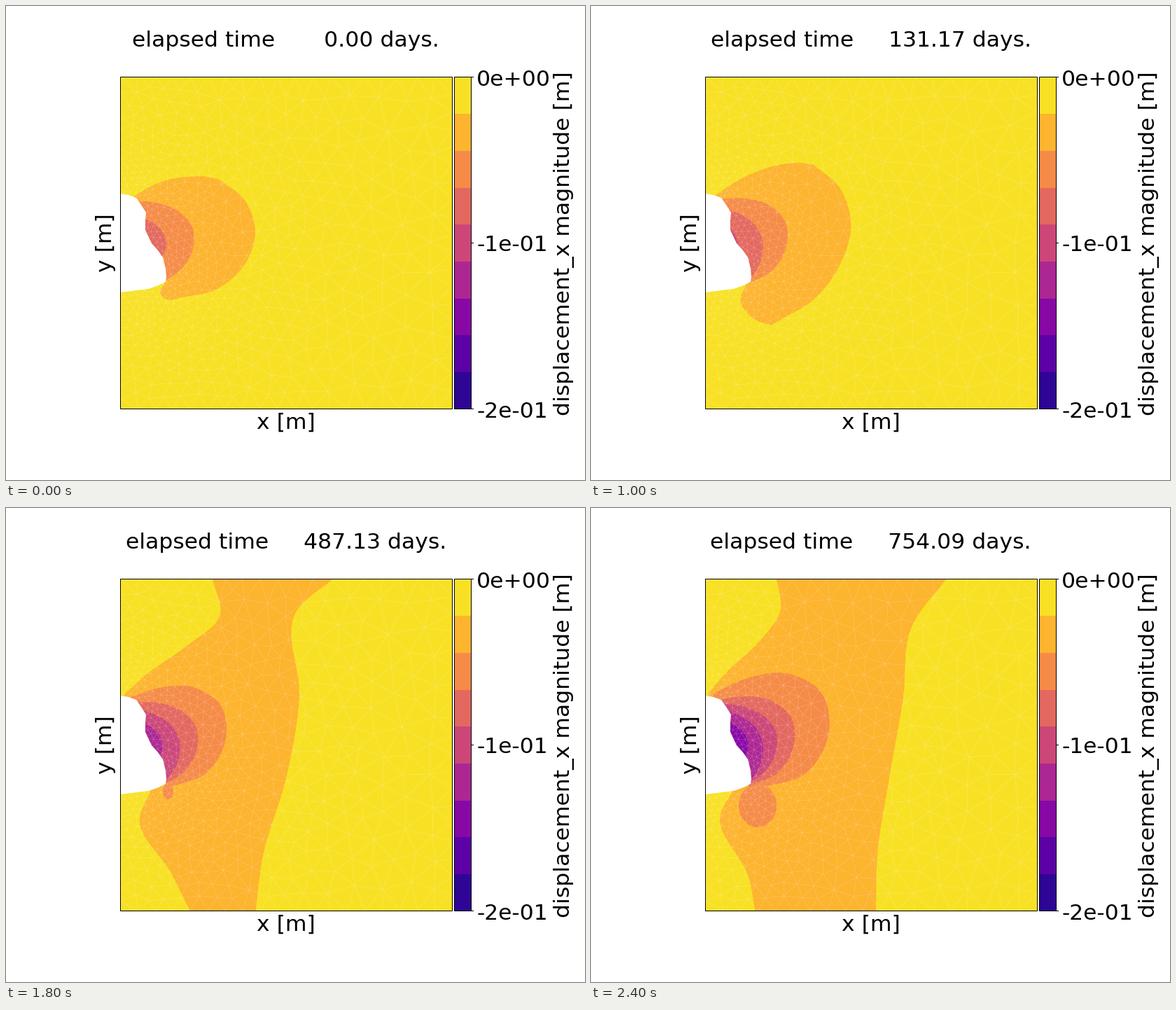
Write a matplotlib script that moves like this. It is 827x677 px and loops after 2500 ms.

```python
import numpy as np
import matplotlib.pyplot as plt
from matplotlib.animation import FuncAnimation
from matplotlib.collections import LineCollection
from matplotlib.patches import Polygon, Rectangle
from matplotlib.path import Path
from matplotlib.tri import Triangulation

W, H, DPI = 827, 677, 64
PT = 72 / DPI
X0, X1, Y0, Y1 = 163.5, 637.5, 101.5, 575.5
MERGE = 465  # day on which the outer band reaches top and bottom

# Time steps grow by half until they reach their cap.
DAYS = np.append(0, np.cumsum(1e5 / 86400 * 1.5 ** np.minimum(np.arange(24), 9)))

CAVITY = np.array([
    (150, 267), (163, 268), (175, 270), (186, 274), (193, 284), (200, 295),
    (199, 306), (199, 320), (208, 339), (217, 349), (224, 359), (228, 375),
    (229, 387), (228, 394), (218, 399), (204, 404), (163, 409), (150, 409)])
INSIDE = [(185, 340)]  # contours close through the cavity

# Outer band: upper left, right and lower left edges at four days.
BLOB_START = ([(181, 273), (204, 259), (232, 248), (258, 244), (281, 243)],
              [(303, 247), (340, 276), (356, 322), (341, 369), (302, 404), (248, 417)],
              [(236, 420), (225, 417), (220, 407), (227, 397)])
BLOB_END = ([(170, 265), (206, 236), (254, 207), (296, 185), (331, 177)],
            [(353, 178), (390, 218), (408, 292), (388, 375), (351, 460), (326, 522)],
            [(310, 541), (262, 525), (198, 447), (208, 403)])
STRIP_START = ([(168, 266), (200, 235), (252, 195), (294, 150), (284, 98)],
               [(484, 98), (428, 157), (428, 270), (409, 384), (381, 497), (373, 580)],
               [(255, 580), (233, 525), (189, 440), (205, 405)])
STRIP_END = ([(167, 265), (196, 232), (240, 191), (271, 144), (264, 98)],
             [(510, 98), (457, 172), (446, 270), (427, 380), (409, 497), (407, 580)],
             [(235, 580), (226, 530), (185, 437), (202, 405)])

# All inner levels share one family of curves, ordered by load / level.
RATIO = [0.28, 0.333, 0.355, 0.5, 0.98]
FAMILY = np.array([
    [(190, 318), (196, 322), (200, 327), (203, 333), (205, 338), (206, 344), (200, 348)],
    [(197, 303), (211, 311), (222, 321), (228, 336), (228, 346), (224, 355), (214, 362)],
    [(193, 292), (214, 303), (230, 318), (238, 338), (238, 357), (232, 378), (222, 394)],
    [(186, 278), (214, 281), (244, 292), (266, 316), (266, 350), (250, 376), (222, 396)],
    [(174, 265), (222, 243), (282, 236), (330, 263), (341, 318), (310, 377), (235, 402)]])


def smooth(p, n=10):
    """Hermite curve through the points, parametrised by chord length."""
    h = np.hypot(*np.diff(p, axis=0).T)
    m = np.gradient(p, np.append(0, np.cumsum(h)), axis=0)
    u = np.linspace(0, 1, n)[:, None, None]
    h = h[:, None]
    c = ((2 * u**3 - 3 * u**2 + 1) * p[:-1] + (u**3 - 2 * u**2 + u) * h * m[:-1]
         + (3 * u**2 - 2 * u**3) * p[1:] + (u**3 - u**2) * h * m[1:])
    return c.transpose(1, 0, 2).reshape(-1, 2)


def ellipse(cx, cy, rx, ry):
    a = np.linspace(0, 2 * np.pi, 60)
    return np.column_stack([cx + rx * np.cos(a), cy + ry * np.sin(a)])


def outer(day):
    if day < MERGE:
        start, end, f = BLOB_START, BLOB_END, (day / 398) ** 1.1
    else:
        start, end, f = STRIP_START, STRIP_END, (day - 576) / 178
    edges = [smooth((1 - f) * np.array(a) + f * np.array(b)) for a, b in zip(start, end)]
    return np.vstack(edges + [INSIDE])


def cap(day):
    if 305 < day < MERGE:
        g = (day - 305) / 93
        return ellipse(378, Y0, 62 * g ** 0.5, 27 * g)


def foot(day):
    if day > 390:
        g = (day - 390) / 364
        return ellipse(229 + 9 * g, 398 + 27 * g, 27 * g, 4 + 27 * g)


def inner(level):
    def rule(day):
        ratio = (1 + day / 795) / level
        if ratio > RATIO[0]:
            flat = [np.interp(ratio, RATIO, c) for c in FAMILY.reshape(len(RATIO), -1).T]
            return np.vstack([smooth(np.reshape(flat, (-1, 2))), INSIDE])
    return rule


def mesh():
    """Edges of a triangle mesh that gets finer towards the cavity."""
    rng = np.random.default_rng(4)
    t = np.linspace(0, 1, 8)[:, None, None]
    rim = (CAVITY[1:-2] * (1 - t) + CAVITY[2:-1] * t).reshape(-1, 2)

    def spacing(p):
        d = np.hypot(*(p[:, None] - rim[None]).T).min(axis=0)
        return np.clip(6 + 0.095 * d, 6, 34)

    border = [(x, y) for x in np.linspace(X0, X1, 20) for y in (Y0, Y1)]
    border += [(X1, y) for y in np.linspace(Y0, Y1, 20)[1:-1]]
    y = Y0
    while y < Y1 - 12:
        y += spacing(np.array([(X0, y)]))[0]
        border.append((X0, y))
    k = len(border)

    cand = rng.uniform((X0 + 3, Y0 + 3), (X1 - 3, Y1 - 3), (24000, 2))
    cand = cand[~Path(CAVITY).contains_points(cand)]
    cand = np.vstack([rim, cand])
    reach = 0.8 * np.concatenate([spacing(c) for c in np.array_split(cand, 12)])
    pts = np.empty((k + len(cand), 2))
    pts[:k] = border
    n = k
    for p, r in zip(cand, reach):
        if ((pts[:n] - p) ** 2).sum(axis=1).min() > r * r:
            pts[n] = p
            n += 1
    pts = pts[:n]
    for _ in range(3):
        a, b = Triangulation(*pts.T).edges.T
        total, count = np.zeros_like(pts), np.zeros((n, 1))
        for i, j in ((a, b), (b, a)):
            np.add.at(total, i, pts[j])
            np.add.at(count, i, 1)
        pts[k:] = (total / np.maximum(count, 1))[k:]
    return pts[Triangulation(*pts.T).edges]


def shade(k):
    return plt.colormaps["plasma"]((8.5 - k) / 9)


plt.rcParams.update({"font.family": "DejaVu Sans", "font.size": 31.4 * PT})
fig = plt.figure(figsize=(W / DPI, H / DPI), dpi=DPI, facecolor="white")
ax = fig.add_axes([0, 0, 1, 1])
ax.set(xlim=(0, W), ylim=(H, 0))
ax.axis("off")


def box(x0, y0, x1, y1, **kw):
    return ax.add_patch(Rectangle((x0, y0), x1 - x0, y1 - y0, **kw))


def frame(x0, x1):
    box(x0, Y0, x1, Y1, fc="none", ec="black", lw=PT, zorder=5, snap=False)


def label(x, y, s, **kw):
    return ax.text(x, y, s, va="baseline", rotation_mode="anchor", **kw)


stage = box(X0, Y0, X1, Y1, fc=shade(0), lw=0)
frame(X0, X1)

BANDS = [(outer, 1), (cap, 1), (inner(2), 2), (foot, 2)]
BANDS += [(inner(k), k) for k in range(3, 8)]
shapes = []
for _, k in BANDS:
    shape = ax.add_patch(Polygon([(0, 0), (1, 0), (1, 1)], fc=shade(k), lw=0, zorder=2))
    shape.set_clip_path(stage)
    shapes.append(shape)

net = ax.add_collection(LineCollection(mesh(), colors=(1, 1, 1, 0.3),
                                       linewidths=0.5 * PT, zorder=3), autolim=False)
net.set_clip_path(stage)
hole = ax.add_patch(Polygon(CAVITY, fc="white", lw=0, zorder=4))
hole.set_clip_path(stage)

step = (Y1 - Y0) / 9
for k in range(9):
    box(640.5, Y0 + k * step, 664.5, Y0 + (k + 1) * step, fc=shade(k), lw=0)
frame(640.5, 664.5)
for y, s in zip((Y0, (Y0 + Y1) / 2, Y1), ("0e+00", "-1e-01", "-2e-01")):
    ax.plot([664.5, 668], [y, y], color="black", lw=PT, solid_capstyle="butt", snap=False)
    label(672, y + 12, s, ha="left")

label(399.7, 604, "x [m]", ha="center")
label(151, 338.5, "y [m]", ha="center", rotation=90)
label(805, 338.8, "displacement_x magnitude [m]", ha="center", rotation=90)
title = label(399.7, 58, "", ha="center")


def draw(i):
    day = DAYS[i]
    title.set_text(f"elapsed time {day:10.2f} days.")
    for shape, (rule, _) in zip(shapes, BANDS):
        outline = rule(day)
        shape.set_visible(outline is not None)
        if outline is not None:
            shape.set_xy(outline)
    return [title, *shapes]


anim = FuncAnimation(fig, draw, frames=len(DAYS), interval=100, repeat=True,
                     repeat_delay=0, blit=False)
plt.show()
```
